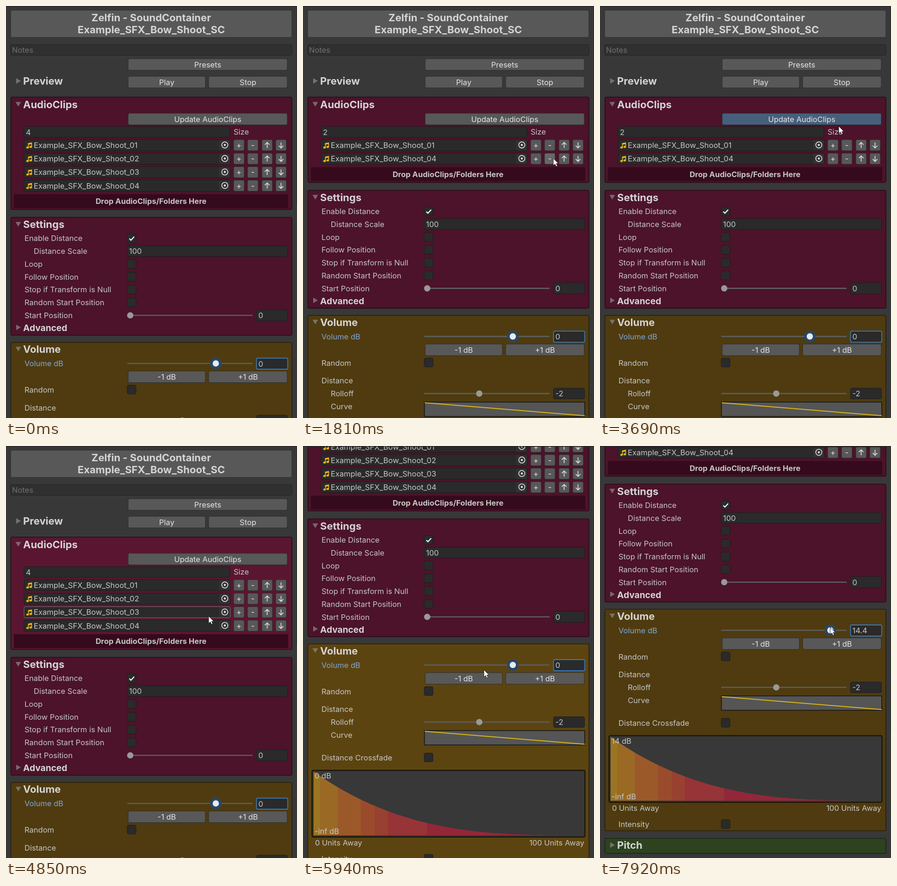
These frames come from a looping animation (629x891 px, 8000 ms). An HTML page:

```html
<!DOCTYPE html>
<html lang="en">
<head>
<meta charset="utf-8">
<title>Sound container inspector</title>
<style>
html, body { margin: 0; width: 100%; height: 100%; overflow: hidden; background: #383838; }
svg { display: block; width: 629px; height: 891px; }
text { font: 16.5px Inter, sans-serif; fill: #c6c6c6; white-space: pre; }
.head { font-size: 22px; font-weight: 700; fill: #d4d4d4; }
.sub { font-size: 19.2px; font-weight: 700; fill: #d4d4d4; }
.bold { font-weight: 700; }
.mid { text-anchor: middle; }
.end { text-anchor: end; }
.field { fill: #2a2a2a; stroke: #1c1c1c; }
.field.hover { stroke: #777; }
.button { fill: #585858; stroke: #2a2a2a; }
.button.hover { fill: #676767; }
.button.down { fill: #46607c; }
.red { fill: #4c132a; stroke: #290b18; }
.red.glow { fill: #5a1630; }
.brown { fill: #4f3b0f; stroke: #2a200b; }
.brown.glow { fill: #5c4411; }
.green { fill: #2d421f; stroke: #1a2713; }
.line { fill: none; stroke: #dedede; stroke-width: 1.7; }
</style>
</head>
<body>
<svg id="stage" viewBox="0 0 629 891"></svg>
<script>
const PITCH = 29.2;
const LOOP = 8000;

const box = (x, y, w, h, cls, extra = '') =>
  `<rect x="${x}" y="${y}" width="${w}" height="${h}" rx="3" class="${cls}" ${extra}/>`;
const text = (x, y, str, cls = '', extra = '') =>
  `<text x="${x}" y="${y}" class="${cls}" ${extra}>${str}</text>`;
const button = (x, y, w, h, label, id = '') =>
  box(x, y, w, h, 'button', id && `id="${id}"`) +
  text(x + w / 2, y + h / 2 + 6, label, 'mid', 'style="fill:#e4e4e4"');
const field = (x, y, w, h, value, id = '') =>
  box(x, y, w, h, 'field') + text(x + 4, y + h / 2 + 6, value, '', id && `id="${id}"`);
const panel = (y, h, cls, id) =>
  box(10.5, y, 607.5, h, cls, `id="${id}" stroke-width="1.6"`);
const foldout = (y, label, open, cls = 'head') =>
  `<path d="${open ? `M20.5 ${y - 13}h12l-6 10z` : `M22 ${y - 14}l10 6-10 6z`}" fill="#858585" opacity=".75"/>` +
  text(37, y, label, cls);
const check = (y, on) => box(262, y, 19, 19, 'field') +
  (on ? `<path d="M266.5 ${y + 10}l3.5 3.5 7-7.5" class="line" style="stroke:#f4f4f4;stroke-width:2.3"/>` : '');
const track = y => `<path d="M262 ${y}H533" stroke="#5e5e5e" stroke-width="2.6"/>`;
const knob = (x, y) => `<circle cx="${x}" cy="${y}" r="6.8" fill="#999"/>`;

const note = y => `<g fill="#f0b41c"><ellipse cx="46.6" cy="${y + 5}" rx="2.8" ry="2.2"/>
  <ellipse cx="53.4" cy="${y + 3.8}" rx="2.8" ry="2.2"/>
  <path d="M47.6 ${y - 4.4}l8.6-1.6v10h-1.7v-6.2l-5.2 1v6.4h-1.7z"/></g>`;

function clipRow(i) {
  const y = 301 + i * PITCH, top = y - 12;
  const arrow = (x, s) => box(x, top, 23, 24, 'button') +
    `<path d="M${x + 11.5} ${y + 6 * s}v${-12 * s}m-5 ${5 * s}l5 ${-5 * s} 5 ${5 * s}" class="line"/>`;
  return `<g class="row">${box(39, top, 446, 24, 'field')}
    <rect x="461" y="${top + 1}" width="23" height="22" fill="#323232"/>
    ${note(y)}${text(60, y + 6, '', 'name')}
    <circle cx="473" cy="${y - 0.5}" r="6.6" class="line"/><circle cx="473" cy="${y - 0.5}" r="2.3" fill="#dedede"/>
    ${button(492, top, 23, 24, '+')}${button(522, top, 23, 24, '-', 'minus' + i)}
    ${arrow(553, 1)}${arrow(583, -1)}</g>`;
}

// Volume falls off as a cube; the fill runs through warm bands.
function falloff() {
  const x0 = 23, y0 = 1141.5, w = 582, h = 138;
  let d = `M${x0} ${y0}`;
  for (let i = 0; i <= 60; i++) d += `L${x0 + w * i / 60} ${y0 - h * (1 - i / 60) ** 3}`;
  const bands = [[23, '#9c7522'], [37, '#9a6924'], [75, '#9b592a'], [125, '#9a4b2c'],
    [155, '#984130'], [183, '#963437'], [268, '#93273a']];
  const strips = bands.map(([x, c], i) =>
    `<rect x="${x}" y="1002" width="${(bands[i + 1]?.[0] ?? 606) - x}" height="140" fill="${c}"/>`).join('');
  return box(19.5, 1001, 590, 144, '', 'fill="#383838" stroke="#1c1609" stroke-width="2.4"') +
    `<clipPath id="under"><path d="${d}V${y0}z"/></clipPath><g clip-path="url(#under)">${strips}</g>` +
    text(25, 1018.5, '0 dB', '', 'id="peak"') + text(25, 1138, '-inf dB');
}

const settings = ['Loop', 'Follow Position', 'Stop if Transform is Null', 'Random Start Position'];

stage.innerHTML = `
<g id="page">
  ${box(10, 9, 608, 59, 'button')}
  ${text(314, 33, 'Zelfin - SoundContainer', 'head mid')}
  ${text(314, 59, 'Example_SFX_Bow_Shoot_SC', 'head mid')}
  ${box(10, 83.5, 608, 23, '', 'fill="#303030" stroke="#222"')}
  ${text(13, 101, 'Notes', '', 'style="fill:#707070"')}
  ${button(264, 114, 344, 25, 'Presets')}
  ${foldout(170, 'Preview', false)}
  ${button(264, 152, 167, 25, 'Play')}${button(438, 152, 170, 25, 'Stop')}
  ${panel(197, 243, 'red', 'clips')}
  ${foldout(220.5, 'AudioClips', true)}
  ${button(264, 232, 344, 25, 'Update AudioClips', 'update')}
  ${field(39, 261, 445, 23, '4', 'count')}${text(492, 278, 'Size')}
  ${[0, 1, 2, 3].map(clipRow).join('')}
  <g id="lower">
    <rect x="17" y="407" width="593" height="30" fill="#350a1c"/>
    ${text(313.5, 428, 'Drop AudioClips/Folders Here', 'bold mid')}
    ${panel(457, 255, 'red', 'settings')}
    ${foldout(480, 'Settings', true)}
    ${text(40, 508, 'Enable Distance')}${check(493, true)}
    ${text(60, 536, 'Distance Scale')}${field(262, 518.5, 347, 23, '100')}
    ${settings.map((s, i) => text(40, 564 + i * 27.7, s) + check(548.5 + i * 27.7)).join('')}
    ${text(40, 675, 'Start Position')}${track(669)}${knob(268.5, 669)}${field(541.5, 657, 67, 24, '0')}
    ${foldout(703, 'Advanced', false, 'sub')}
    ${panel(727.5, 479, 'brown', 'volume')}
    ${foldout(750, 'Volume', true)}
    ${text(40, 779, 'Volume dB', '', 'style="fill:#80a5d6"')}${track(773)}
    <g id="gain"><circle cy="773" r="12.3" fill="#24486a"/><circle cy="773" r="6.8" fill="#eaeaea"/></g>
    ${field(541.5, 761.5, 67, 24, '0', 'level')}
    ${box(541.5, 761.5, 67.5, 24, '', 'fill="none" stroke="#3a79bb" stroke-width="1.8"')}
    ${button(264, 789.5, 167, 25, '-1 dB')}${button(438, 789.5, 170, 25, '+1 dB')}
    ${text(40, 836, 'Random')}${check(820)}
    ${text(40, 874.5, 'Distance')}
    ${text(60, 902.5, 'Rolloff')}${track(896.5)}${knob(381, 896.5)}${field(541.5, 885, 67, 23, '-2')}
    ${text(60, 930, 'Curve')}
    <rect x="262.5" y="915" width="346.5" height="31" fill="#555" stroke="#121212" stroke-width="1.5"/>
    <path d="M263 916.5L609 944.5" stroke="#d8b51a" stroke-width="2"/>
    ${text(40, 979.5, 'Distance Crossfade')}${check(963.5)}
    ${falloff()}
    ${text(26, 1163, '0 Units Away')}${text(608, 1163, '100 Units Away', 'end')}
    ${text(40, 1198, 'Intensity')}${check(1182.5)}
    ${panel(1223, 32.5, 'green', 'pitch')}${foldout(1245.5, 'Pitch', false)}
  </g>
</g>
<rect width="629" height="1.5" fill="#242424"/>
<rect id="thumb" x="628" width="1" fill="#2b2b2b"/>
<path id="cursor" d="M0 0V15.5L3.7 12.3 6.1 17.6 8.8 16.4 6.4 11.2H11.2Z" fill="#fff" stroke="#1a1a1a" stroke-width=".9"/>`;

// Hard steps: [time, value]
const clipSteps = [[0, [1, 2, 3, 4]], [1350, [1, 3, 4]], [1810, [1, 4]], [4280, [1, 2, 3, 4]]];
const scrollSteps = [[0, 0], [5430, 75], [5550, 149.7], [5820, 225], [5940, 299.5], [6370, 374.5]];
const minusSteps = [[0, ''], [960, 'hover'], [1290, 'down'], [1350, 'hover'], [1690, 'down'], [1810, 'hover'], [2030, '']];
const updateSteps = [[0, ''], [2580, 'hover'], [2700, 'down'], [4280, '']];
const glowSteps = [[0, ''], [4340, 'clips'], [5170, 'settings'], [5940, 'volume'], [7150, '']];
// Eased paths: [time, ...values]
const cursorPath = [[500, 440, 374], [960, 548, 332], [1040, 559, 330], [1140, 541, 329.5], [1990, 541, 329.5],
  [2160, 616, 330], [2310, 616, 330], [2640, 595, 249], [2700, 594, 248], [3060, 531, 267], [3120, 531, 267],
  [3690, 516, 260], [4280, 516, 260], [4850, 438, 368], [5050, 437, 374], [5110, 437, 376], [5280, 391, 484],
  [6370, 391, 484], [7150, 453, 392], [7550, 490, 392], [7710, 490, 392], [7920, 497.5, 392]];
const gainPath = [[7150, 0], [7550, 12.1], [7710, 12.1], [7920, 14.4]];

const stepAt = (steps, t) => steps.findLast(s => s[0] <= t)[1];

function pathAt(path, t) {
  const next = path.findIndex(p => p[0] > t);
  if (next < 1) return (next ? path.at(-1) : path[0]).slice(1);
  const a = path[next - 1], b = path[next];
  const u = (t - a[0]) / (b[0] - a[0]);
  return a.slice(1).map((v, i) => v + (b[i + 1] - v) * u);
}

const $ = id => document.getElementById(id);
const rows = [...document.querySelectorAll('.row')];

function draw(t) {
  const clips = stepAt(clipSteps, t);
  const scroll = stepAt(scrollSteps, t);
  const [x, y] = pathAt(cursorPath, t);
  const [gain] = pathAt(gainPath, t);
  const shift = (clips.length - 4) * PITCH;
  const glow = stepAt(glowSteps, t);
  const hovered = t >= 500 && !scroll && x > 39 && x < 485 ? Math.floor((y - 288) / PITCH) : -1;

  $('page').setAttribute('transform', `translate(0 ${-scroll})`);
  $('lower').setAttribute('transform', `translate(0 ${shift})`);
  $('clips').setAttribute('height', 243 + shift);
  $('count').textContent = clips.length;
  rows.forEach((row, i) => {
    row.style.display = i < clips.length ? '' : 'none';
    row.querySelector('.name').textContent = 'Example_SFX_Bow_Shoot_0' + clips[i];
    row.querySelector('.field').classList.toggle('hover', i === hovered);
  });
  $('minus1').setAttribute('class', 'button ' + stepAt(minusSteps, t));
  $('update').setAttribute('class', 'button ' + stepAt(updateSteps, t));
  for (const id of ['clips', 'settings', 'volume']) $(id).classList.toggle('glow', id === glow);

  $('gain').setAttribute('transform', `translate(${453.5 + gain * 3.09} 0)`);
  $('level').textContent = Math.round(gain * 10) / 10;
  $('peak').textContent = Math.round(gain) + ' dB';
  $('thumb').setAttribute('y', scroll * 0.507);
  $('thumb').setAttribute('height', 430 - shift * 0.2);
  $('cursor').setAttribute('transform', `translate(${x} ${y})`);
  $('cursor').style.display = t < 500 ? 'none' : '';
}

const start = performance.now();
function frame() {
  draw((performance.now() - start) % LOOP);
  requestAnimationFrame(frame);
}
frame();
</script>
</body>
</html>
```
